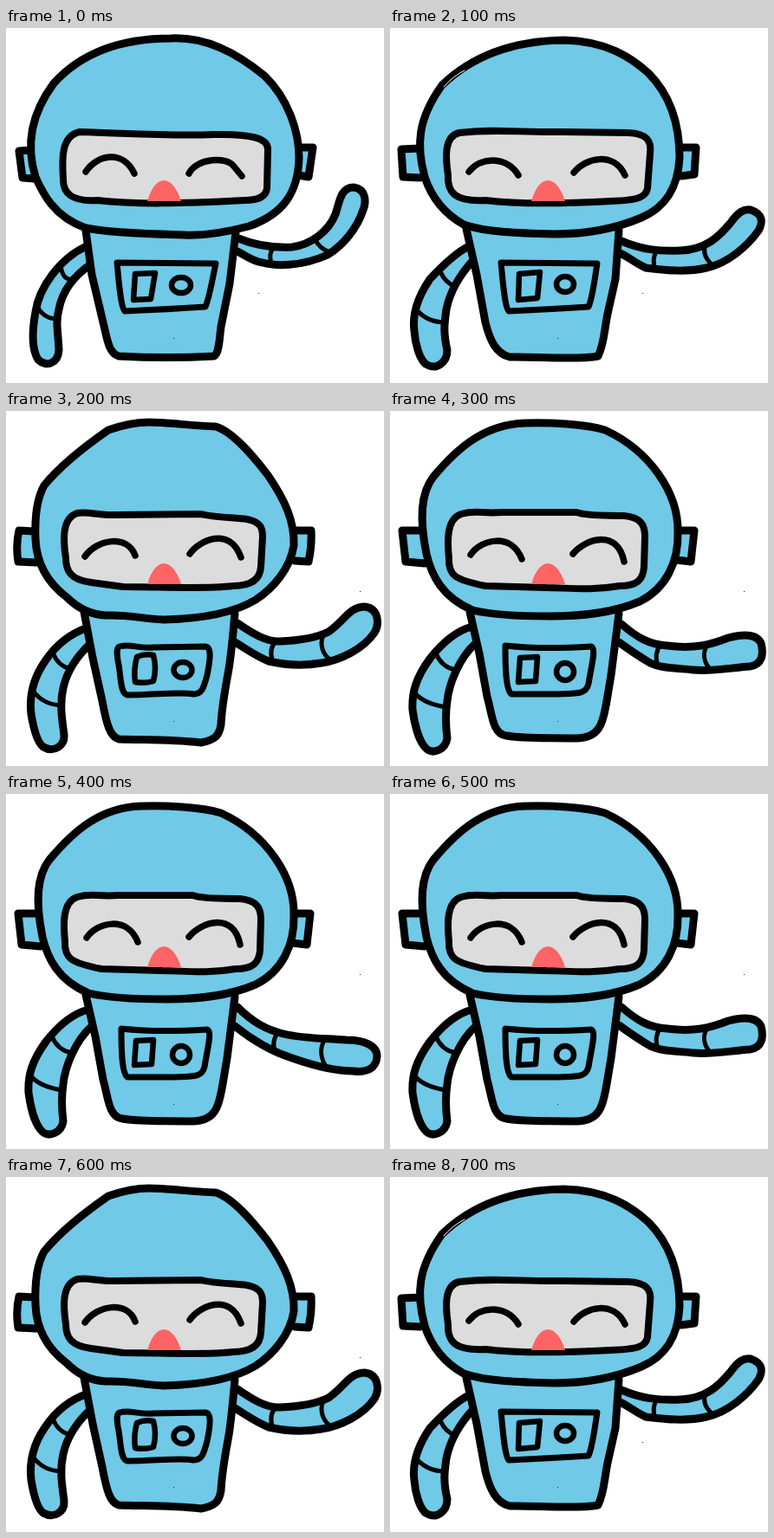
Write an HTML page without scripts that moves like this. It is 436 px wide and 410 px high and loops after 0.8 s.

```html
<!DOCTYPE html>
<html lang="en">
<head>
<meta charset="utf-8">
<title>Waving robot</title>
<style>
  html, body { margin: 0; width: 100%; height: 100%; overflow: hidden; background: #fff; }
  svg { display: block; width: 436px; height: 410px; }

  path, ellipse { fill: none; stroke: #000; stroke-width: 8; stroke-linecap: round; stroke-linejoin: round; }
  .skin { fill: #6fc9e7; stroke-width: 9; }
  .visor { fill: #dcdcdc; }
  .mouth { fill: #ff6464; stroke: none; }
  .eye { stroke-width: 7.5; }
  .panel { stroke-width: 7; }
  .knob { stroke-width: 6.5; }
  .joint { stroke-width: 5; }
  .speck { fill: #222; }
  .gap { stroke: #fff; stroke-width: 1; }

  .pose { visibility: hidden; animation: 800ms step-end infinite; }
  .high { animation-name: high; }
  .raised { animation-name: raised; }
  .mid { animation-name: mid; }
  .low { animation-name: low; }
  .level { animation-name: level; }
  .lowest { animation-name: lowest; }

  @keyframes high { 0% { visibility: visible } 12.5%, 100% { visibility: hidden } }
  @keyframes raised { 0%, 25% { visibility: hidden } 12.5%, 87.5%, 100% { visibility: visible } }
  @keyframes mid { 0%, 37.5%, 87.5%, 100% { visibility: hidden } 25%, 75% { visibility: visible } }
  @keyframes low { 0%, 75%, 100% { visibility: hidden } 37.5% { visibility: visible } }
  @keyframes level { 0%, 50%, 75%, 100% { visibility: hidden } 37.5%, 62.5% { visibility: visible } }
  @keyframes lowest { 0%, 62.5%, 100% { visibility: hidden } 50% { visibility: visible } }
</style>
</head>
<body>
<svg viewBox="0 0 436 410">
  <defs>
    <path id="mouth" class="mouth" d="M163 200C172 168 192 168 202 200Z"/>
    <rect id="speck" class="speck" width="1" height="1"/>
  </defs>

  <g class="pose high">
    <path class="skin" d="M93 252C62 266 38 300 34 328C30 350 29 370 37 383C46 392 60 388 61 372C60 350 57 340 61 325C65 303 80 285 99 272"/>
    <path class="joint" d="M64 279C66 289 72 291 77 290M36 321C42 334 52 336 60 336"/>
    <path class="skin" d="M268 243C290 252 310 254 330 253C352 250 372 235 380 215C385 200 386 184 401 184C415 186 416 200 412 210C405 231 390 250 371 262C340 276 310 275 296 271C285 270 275 262 267 258"/>
    <path class="joint" d="M310 253C303 258 304 268 307 274M356 243C360 252 367 257 374 259"/>
    <path class="skin" d="M92 234L99 285L112 340C117 360 118 375 130 379C165 381 205 381 240 379C246 375 246 360 248 345L258 295L265 236"/>
    <path class="panel" d="M128 271L242 272C238 290 235 310 230 322C200 324 160 326 137 327C132 322 130 290 128 271Z"/>
    <path class="knob" d="M149 284L172 283L167 313L147 314Z"/>
    <ellipse class="knob" cx="202" cy="297" rx="11" ry="9"/>
    <path class="skin" d="M30 141L15 142L19 173L33 174M339 138L354 138L349 172L337 170"/>
    <path class="skin" d="M190 12C230 10 265 28 298 55C326 82 338 120 338 150C337 190 320 215 280 229C250 237 225 240 205 239C170 238 120 237 92 231C55 218 42 190 34 172C21 130 32 95 55 64C90 25 140 12 190 12Z"/>
    <path class="visor" d="M85 120C150 122 190 125 240 123C285 122 302 128 302 140L301 185C300 195 290 199 275 199C200 203 150 204 105 199C75 201 66 190 66 175C65 155 62 125 85 120Z"/>
    <path class="eye" d="M92 166C105 146 135 140 148 168M211 168C220 150 255 148 263 160L272 171"/>
    <use href="#mouth"/>
    <use href="#speck" x="193" y="358"/>
    <use href="#speck" x="291" y="306"/>
  </g>

  <g class="pose raised">
    <path class="skin" d="M91 252C75 260 60 275 46 290C29 315 26 335 28 350C29 365 34 382 41 388C54 396 66 386 66 372C61 350 63 340 65 325C70 300 85 280 97 267"/>
    <path class="joint" d="M58 281C62 291 68 296 76 299M31 326C40 336 52 340 64 340"/>
    <path class="skin" d="M267 246C290 256 310 258 335 257C365 256 380 240 392 226C402 212 408 209 416 210C431 215 430 225 425 234C413 251 390 272 365 277C340 283 312 279 295 277C283 272 275 264 265 260"/>
    <path class="joint" d="M308 257C303 264 304 270 305 277M364 250C360 260 366 268 370 272"/>
    <path class="skin" d="M88 232L100 285L110 340C115 360 122 376 138 380C165 379 215 384 240 379C247 365 247 350 251 330L260 290L264 234"/>
    <path class="panel" d="M128 271L239 272C236 290 234 310 229 322C200 324 160 326 137 327C132 322 130 290 128 271Z"/>
    <path class="knob" d="M149 284L173 282L170 312L148 314Z"/>
    <ellipse class="knob" cx="202" cy="296" rx="10" ry="9"/>
    <path class="skin" d="M34 139L13 140L15 172L35 173M336 138L353 138L351 169L336 171"/>
    <path class="skin" d="M200 14C250 15 278 34 298 52C326 80 334 115 334 150C332 185 318 207 290 219C255 234 220 238 190 238C150 237 110 236 85 227C58 212 46 190 40 172C30 135 32 105 60 66C95 32 140 15 200 14Z"/>
    <path class="gap" d="M62 68Q72 56 86 49"/>
    <path class="visor" d="M80 121C120 116 150 121 200 120L275 121C296 122 302 130 300 145L297 185C295 199 275 199 255 200C200 203 150 204 110 199C75 201 66 190 67 170C64 150 62 125 80 121Z"/>
    <path class="eye" d="M91 166C105 148 135 148 148 170M212 167C225 150 258 142 271 170"/>
    <use href="#mouth"/>
    <use href="#speck" x="193" y="358"/>
    <use href="#speck" x="291" y="306"/>
  </g>

  <g class="pose mid">
    <path class="skin" d="M95 250C70 258 55 274 45 289C29 312 27 332 29 350C32 368 36 383 43 388C55 395 68 387 67 374C64 352 62 338 66 320C71 297 84 281 98 268"/>
    <path class="joint" d="M54 279C58 290 66 296 75 298M31 323C40 335 50 339 63 340"/>
    <path class="skin" d="M267 245C283 256 300 267 316 266C340 265 360 261 372 255C390 243 396 226 414 226C430 228 431 246 425 256C412 275 385 288 364 291C340 295 320 293 303 289C288 283 276 274 264 267"/>
    <path class="joint" d="M311 267C305 272 305 280 307 288M366 259C361 270 366 282 374 287"/>
    <path class="skin" d="M90 232L100 285L111 335C116 362 120 376 130 379C165 380 190 379 225 383C240 380 246 376 248 362C249 340 254 315 257 298C260 280 262 255 264 234"/>
    <path class="panel" d="M131 272C145 268 150 275 170 273L230 272C238 273 235 290 232 305C228 320 226 327 216 327C200 324 170 328 140 328C131 326 133 305 129 288C128 280 127 274 131 272Z"/>
    <path class="knob" d="M151 284Q160 280 170 282Q174 297 170 312Q160 315 149 313Q147 298 151 284Z"/>
    <ellipse class="knob" cx="204" cy="299" rx="10.5" ry="9"/>
    <path class="skin" d="M33 139L15 138Q11 155 14 174L35 175M333 138L352 138Q353 155 349 174L333 173"/>
    <path class="skin" d="M165 13C185 13 215 17 242 18C262 24 285 52 302 74C322 103 333 128 332 155C328 182 308 205 288 218C262 234 222 240 182 241C155 240 145 235 115 236C95 235 80 225 70 215C45 196 35 172 34 148C33 122 36 100 44 86C65 60 95 38 118 22C135 16 150 13 165 13Z"/>
    <path class="visor" d="M82 118C95 116 110 121 125 120L225 119C240 123 265 123 278 125C292 128 296 133 296 145L294 180C293 195 282 202 262 202C230 206 180 203 135 203L98 198C75 195 69 185 69 170C66 150 64 124 82 118Z"/>
    <path class="eye" d="M91 168C105 148 140 142 149 167M212 165C222 150 258 132 271 169"/>
    <use href="#mouth"/>
    <use href="#speck" x="193" y="358"/>
    <use href="#speck" x="408" y="208"/>
  </g>

  <g class="pose low">
    <path class="skin" d="M95 249C75 254 60 268 46 286C30 308 25 325 26 345C28 360 33 382 42 390C50 397 64 391 66 378C64 362 64 348 66 335C68 315 80 285 99 268"/>
    <path class="joint" d="M53 280C58 292 66 297 75 299M30 327C38 336 52 340 65 342"/>
    <g class="pose level">
      <path class="skin" d="M267 246C285 262 300 270 320 271C350 275 370 270 390 262C405 258 422 256 428 268C431 280 430 293 415 295C390 297 370 301 350 299C330 297 312 297 300 291C285 282 275 275 264 267"/>
      <path class="joint" d="M312 270C306 278 306 286 309 294M366 270C360 280 362 290 369 298"/>
    </g>
    <g class="pose lowest">
      <path class="skin" d="M267 246C285 264 300 272 320 277C345 283 370 282 392 284C412 284 428 290 428 303C427 318 415 322 400 320C375 320 350 312 330 305C305 297 285 285 264 268"/>
      <path class="joint" d="M314 275C308 283 307 290 311 298M368 283C361 294 363 306 370 316"/>
    </g>
    <path class="skin" d="M92 232L103 280L112 330C118 350 118 373 134 375C160 379 180 377 215 378C245 378 246 355 250 335L255 305L264 234"/>
    <path class="panel" d="M133 271C160 274 200 274 232 272C238 275 233 290 229 315C226 328 215 326 190 327L140 327C133 322 133 290 133 271Z"/>
    <path class="knob" d="M150 285L170 284L168 312L148 313Z"/>
    <ellipse class="knob" cx="202" cy="301" rx="10" ry="10"/>
    <path class="skin" d="M38 138L14 138L18 174L40 176M333 138L351 138L347 174L330 172"/>
    <path class="skin" d="M155 14C185 13 225 15 248 22C300 46 333 95 332 140C333 175 318 205 288 220C255 234 220 237 185 237C150 237 115 235 95 230C60 215 48 190 42 165C34 125 35 95 50 76C80 40 110 16 155 14Z"/>
    <path class="visor" d="M82 119C100 114 105 119 130 117L215 117C230 122 250 120 270 121C290 123 294 132 294 145L293 180C292 195 285 202 265 202C230 208 205 204 180 204L110 202C75 195 67 190 68 170C66 150 65 125 82 119Z"/>
    <path class="eye" d="M93 166C105 148 140 140 152 171M211 165C225 148 262 135 270 174"/>
    <use href="#mouth"/>
    <use href="#speck" x="193" y="358"/>
    <use href="#speck" x="408" y="208"/>
  </g>
</svg>
</body>
</html>
```
